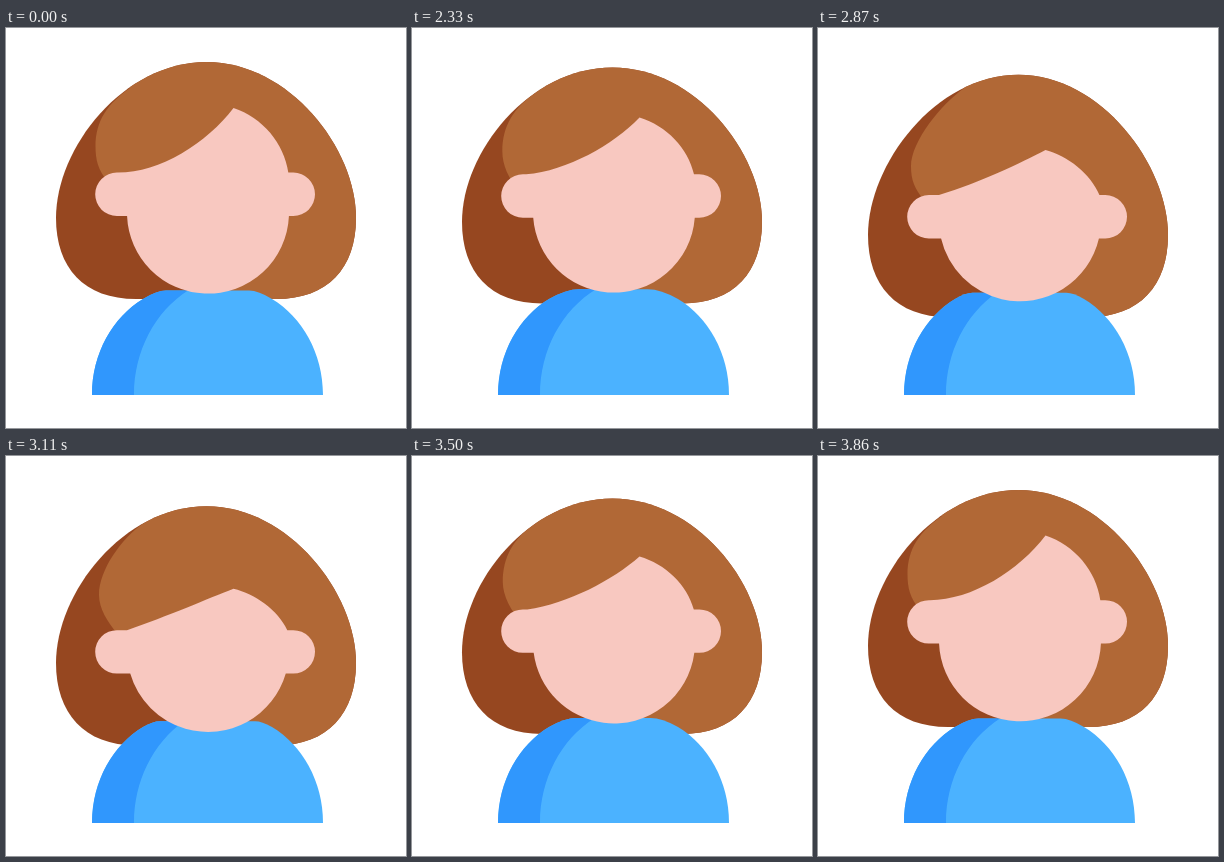
An HTML page with a canvas that plays this animation: 400 by 400 pixels, repeating every 3.89 s.

```html
<!DOCTYPE html>
<html lang="en">
<head>
<meta charset="utf-8">
<title>Nodding avatar</title>
<style>
  html, body { margin: 0; width: 100%; height: 100%; overflow: hidden; background: #fff; }
  canvas { display: block; width: 400px; height: 400px; }
</style>
</head>
<body>
<canvas id="stage" width="400" height="400"></canvas>
<script>
const ctx = document.getElementById('stage').getContext('2d');
const LOOP = 3890, START = 2030, STEP = 30;
const DARK_HAIR = '#964720', HAIR = '#b16836', SKIN = '#f8c8c0';
const DARK_SHIRT = '#3097fd', SHIRT = '#4bb2ff';

const rest = {
  top: 34, wide: 190, base: 271,             // hair outline
  jx: 124, jy: 60, mx: 89.5, my: 118, ex: 102, ey: 154, // hair shade edge
  ear: 166.3, part: 80, chin: 265.6,
  fx: 112, f1x: 154, f1y: 0, f2x: 201, f2y: 35,         // fringe
  r1x: 256.5, r1y: 9.7, r2x: 278, r2y: 35, rx: 282.3,   // right temple
  collar: 262.5, collarX: 160
};
const up = { ...rest, ear: 155.2, part: 69.5, chin: 259.5, collar: 259.7, collarX: 172 };
const down = {
  top: 57, wide: 207, base: 290,
  jx: 122, jy: 80, mx: 93, my: 140, ex: 121, ey: 188,
  ear: 209.2, part: 153.2, chin: 281,
  fx: 121, f1x: 160, f1y: -16, f2x: 200, f2y: 4,
  r1x: 248, r1y: 4, r2x: 270, r2y: 16, rx: 281,
  collar: 266, collarX: 152
};
const mid = {
  top: 45, wide: 207, base: 289,
  jx: 150, jy: 57, mx: 93, my: 138, ex: 104, ey: 170,
  ear: 185.5, part: 117, chin: 272,
  fx: 121, f1x: 163, f1y: -12, f2x: 204, f2y: 14,
  r1x: 250, r1y: 6, r2x: 273, r2y: 25, rx: 281.5,
  collar: 264.5, collarX: 155
};

const smooth = k => k * k * (3 - 2 * k);
const sineOut = k => Math.sin(k * Math.PI / 2);
const keys = [
  [2000, rest],
  [2200, up, sineOut],
  [2610, down, smooth],
  [2950, mid, smooth],
  [3300, down, smooth],
  [3640, up, smooth],
  [3890, rest, smooth]
];

function poseAt(t) {
  if (t < START) return rest;
  const i = keys.findIndex(k => t < k[0]);
  const [t0, a] = keys[i - 1], [t1, b, ease] = keys[i];
  const k = ease((t - t0) / (t1 - t0)), pose = {};
  for (const n in a) pose[n] = a[n] + (b[n] - a[n]) * k;
  return pose;
}

function fill(path, color) {
  ctx.fillStyle = color;
  ctx.fill(path);
}

function drawHair(p) {
  const outline = new Path2D();
  outline.moveTo(200.5, p.top);
  outline.bezierCurveTo(117, p.top, 50, p.wide - 70, 50, p.wide);
  outline.bezierCurveTo(50, p.wide + 50, 78, p.base, 130, p.base);
  outline.lineTo(270, p.base);
  outline.bezierCurveTo(322, p.base, 350, p.wide + 50, 350, p.wide);
  outline.bezierCurveTo(350, p.wide - 70, 283, p.top, 200.5, p.top);

  const light = new Path2D();
  light.moveTo(p.jx, 0);
  light.lineTo(p.jx, p.jy);
  light.bezierCurveTo(p.jx - 22, p.jy + 15, p.mx, p.my - 25, p.mx, p.my);
  light.bezierCurveTo(p.mx, p.my + 14, p.ex - 10, p.ey - 12, p.ex, p.ey);
  light.lineTo(200, p.ey);
  light.lineTo(200, 400);
  light.lineTo(400, 400);
  light.lineTo(400, 0);

  fill(outline, DARK_HAIR);
  ctx.save();
  ctx.clip(outline);
  fill(light, HAIR);
  ctx.restore();
}

function drawShirt(p) {
  const body = new Path2D(), cx = (137 + p.collarX) / 2 + 2, w = 403;
  body.moveTo(86, 367);
  body.bezierCurveTo(86, 325, 107, 289, 137, 271);
  body.quadraticCurveTo(cx, p.collar, p.collarX, p.collar);
  body.lineTo(w - p.collarX, p.collar);
  body.quadraticCurveTo(w - cx, p.collar, w - 137, 271);
  body.bezierCurveTo(w - 107, 289, 317, 325, 317, 367);

  const shade = new Path2D();
  shade.moveTo(80, 367);
  shade.lineTo(80, 250);
  shade.lineTo(186, 250);
  shade.lineTo(186, 260);
  shade.bezierCurveTo(150, 281, 128, 322, 128, 367);

  fill(body, SHIRT);
  ctx.save();
  ctx.clip(body);
  fill(shade, DARK_SHIRT);
  ctx.restore();
}

function drawFace(p) {
  const earR = 21.7, jawR = 81, cy = p.chin - jawR;
  const earTop = p.ear - earR;
  const a = Math.asin((p.ear + earR - cy) / jawR), q = Math.PI / 2;
  const face = new Path2D();
  face.moveTo(p.fx, earTop);
  face.bezierCurveTo(p.f1x, earTop + p.f1y, p.f2x, p.part + p.f2y, 227.5, p.part);
  face.bezierCurveTo(p.r1x, p.part + p.r1y, p.r2x, p.part + p.r2y, p.rx, earTop);
  face.arc(287.3, p.ear, earR, -q, q);
  face.arc(202, cy, jawR, a, Math.PI - a);
  face.arc(110.9, p.ear, earR, q, 3 * q);
  face.closePath();
  fill(face, SKIN);
}

function draw(now) {
  let t = now % LOOP;
  if (t >= START) t = START + Math.floor((t - START) / STEP) * STEP;
  const p = poseAt(t);
  ctx.fillStyle = '#fff';
  ctx.fillRect(0, 0, 400, 400);
  drawHair(p);
  drawShirt(p);
  drawFace(p);
}

const begin = performance.now();
function tick() {
  draw(performance.now() - begin);
  requestAnimationFrame(tick);
}
tick();
</script>
</body>
</html>
```
